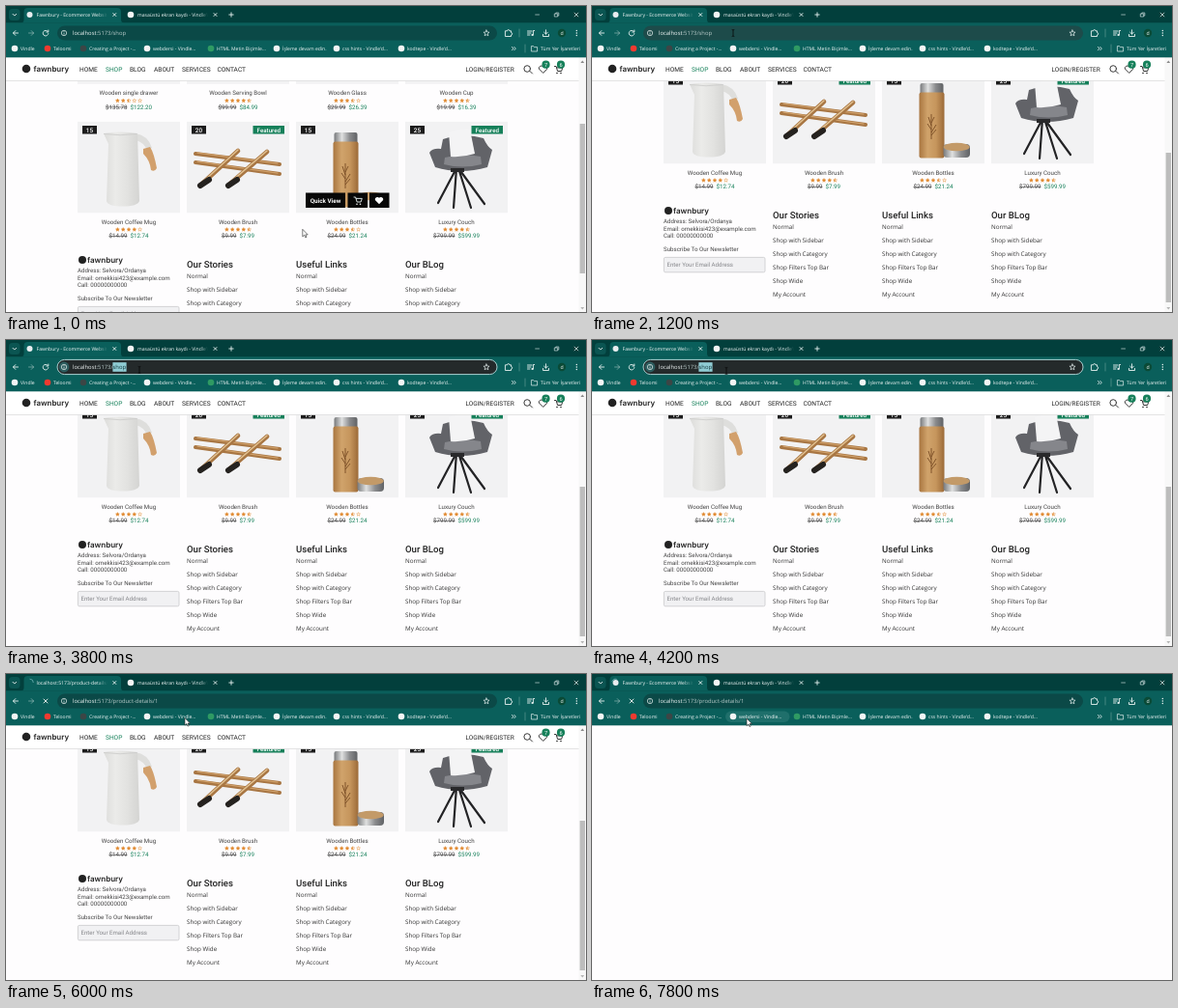
These frames come from a looping animation (600 by 317 pixels, 8 s). An HTML page:

```html
<!DOCTYPE html>
<html lang="tr">
<head>
<meta charset="utf-8">
<title>Fawnbury shop</title>
<style>
html, body { margin: 0; width: 100%; height: 100%; overflow: hidden; background: #fff; }
svg { display: block; width: 100vw; height: 100vh; }
text { white-space: pre; text-rendering: geometricPrecision; }
.ui { font-family: "Open Sans", "Noto Sans", sans-serif; fill: #f2f7f7; }
.pg { font-family: Roboto, Arial, sans-serif; fill: #444; }
.logo { font-family: Inter, Lato, sans-serif; font-weight: 600; fill: #222; }
.ln { fill: none; stroke: #e8f2f1; stroke-width: .9; stroke-linecap: round; stroke-linejoin: round; }
.dk { fill: none; stroke: #222; stroke-width: .9; stroke-linecap: round; stroke-linejoin: round; }
</style>
</head>
<body>
<svg id="stage" viewBox="0 0 600 317" preserveAspectRatio="none"></svg>
<script>
const LOOP = 8000, STEP = 200, SCROLL = 51;
const COLS = [74, 187, 300, 413];
const TEAL = '#0a5f5b', GREEN = '#16805a', ORANGE = '#e0872b', PILL = '#0b4947';

const text = (x, y, size, str, cls = 'ui', more = '') =>
  `<text x="${x}" y="${y}" font-size="${size}" class="${cls}" ${more}>${str}</text>`;
const rect = (x, y, w, h, fill, r = 0, more = '') =>
  `<rect x="${x}" y="${y}" width="${w}" height="${h}" rx="${r}" fill="${fill}" ${more}/>`;
const dot = (x, y, r, fill, more = '') => `<circle cx="${x}" cy="${y}" r="${r}" fill="${fill}" ${more}/>`;
const path = (d, cls = 'ln', more = '') => `<path d="${d}" class="${cls}" ${more}/>`;
const shape = (d, fill, more = '') => `<path d="${d}" fill="${fill}" ${more}/>`;
const group = (id, body, more = '') => `<g id="${id}" ${more}>${body}</g>`;
const cross = (x, y, r, more) => path(`M${x - r} ${y - r}l${2 * r} ${2 * r}m0 ${-2 * r}l${-2 * r} ${2 * r}`, 'ln', more);
const mid = 'text-anchor="middle"';

// Stars
function starPath(cx, cy, r, half) {
  let d = '';
  for (let i = 0; i <= (half ? 5 : 9); i++) {
    const k = half ? i + 5 : i, q = k % 2 ? r * .45 : r, a = k * Math.PI / 5 - Math.PI / 2;
    d += (i ? 'L' : 'M') + (cx + q * Math.cos(a)).toFixed(2) + ' ' + (cy + q * Math.sin(a)).toFixed(2);
  }
  return d + 'Z';
}
function stars(cx, cy, n) {
  let out = '';
  for (let i = 0; i < 5; i++) {
    const x = cx + (i - 2) * 5.8;
    out += shape(starPath(x, cy, 2), n >= i + 1 ? ORANGE : '#fff', `stroke="${ORANGE}" stroke-width=".45"`);
    if (n === i + .5) out += shape(starPath(x, cy, 2, true), ORANGE);
  }
  return out;
}

// Product cards
const rows = [
  [['Wooden single drawer', '135.78', '122.20', 2.5], ['Wooden Serving Bowl', '99.99', '84.99', 4.5],
   ['Wooden Glass', '29.99', '26.39', 3.5], ['Wooden Cup', '19.99', '16.39', 4.5]],
  [['Wooden Coffee Mug', '14.99', '12.74', 4], ['Wooden Brush', '9.99', '7.99', 4.5],
   ['Wooden Bottles', '24.99', '21.24', 3.5], ['Luxury Couch', '799.99', '599.99', 4.5]]
];
function card([name, was, now, rate], x, top) {
  const c = x + 53;
  return rect(x, top, 106, 94.5, '#f2f2f3') +
    text(c, top + 105.7, 6.2, name, 'pg', mid) + stars(c, top + 111.8, rate) +
    text(c, top + 120.6, 6.2, `<tspan text-decoration="line-through">$${was}</tspan>  <tspan fill="${GREEN}">$${now}</tspan>`, 'pg', mid);
}
const badge = (x, n) => rect(x + 5, 124, 15, 8.5, '#1c1c1c') +
  text(x + 12.5, 130.6, 6.4, n, 'pg', mid + ' style="fill:#fff;font-weight:500"');
const featured = x => rect(x + 68.5, 124, 32.5, 8.5, GREEN) +
  text(x + 84.8, 130.5, 6.2, 'Featured', 'pg', mid + ' style="fill:#fff;font-weight:500"');
const stroke = (d, color, w) => path(d, '', `fill="none" stroke="${color}" stroke-width="${w}" stroke-linecap="round"`);

const jug = shape('M134 132Q147 134 151 147L146 150Q143 141 134 139Z', '#dededc') +
  shape('M101 132Q118 129 136 132L138 202Q136 207.5 121 207.5Q105 207.5 104 202L106 143Z', 'url(#jug)') +
  shape('M142 148L149 146Q153 152 156 168Q154 172 150 170Q149 160 142 153Z', '#d2a06c') +
  stroke('M101.5 132.5Q118 135 135 132.5', '#cbcbc9', .8);

const brushes = [[196, 153, 283, 164], [196, 162, 283, 174]].map(([a, b, c, d]) =>
    stroke(`M${a} ${b}L${c} ${d}`, '#a87643', 4) + stroke(`M${a + 2} ${b - .8}L${c - 2} ${d - .8}`, '#cfa06a', 1.2)).join('') +
  [[203, 184, 240, 150], [232, 184, 270, 151]].map(([a, b, c, d]) =>
    stroke(`M${a} ${b}L${c} ${d}`, '#a87643', 4.6) + stroke(`M${a + 2} ${b - 3}L${c} ${d - 1}`, '#e2c190', 1.5) +
    stroke(`M${a - 2} ${b + 2}l9 -6`, '#25221f', 6)).join('');

const bottle = rect(339.5, 131, 24, 12, 'url(#steel)', 2) + rect(338.5, 140.5, 26, 68, 'url(#wood)', 2) +
  path('M351 189V163M351 179l-4-6m4 9l5-8m-5-2l3-6m-3 9l-3-9m3 19l5-6', '', 'fill="none" stroke="#7a4d25" stroke-width=".9"') +
  rect(363.5, 194, 27.5, 14, 'url(#steel)', 4) + `<ellipse cx="377.2" cy="197" rx="13.5" ry="4.3" fill="#c39a68"/>`;

const couch = stroke('M466 168L447 204M466 168L463 209M468 168L481 209M468 168L495 205', '#232325', 2.2) +
  shape('M438 152Q441 147 450 148L452 138Q474 131 494 137Q498 146 503 149L498 167Q470 175 444 167Z', '#626368') +
  shape('M454 157Q472 152 491 156L492 164Q472 169 453 164Z', '#85868b') +
  shape('M458 131Q470 127 480 128L485 153Q472 157 460 156Z', '#f4f4f5') + rect(460, 168, 14, 4, '#29292b');

const heart = (x, y, s) => `M${x} ${y + s}l${-s} ${-s}a${s * .6} ${s * .6} 0 0 1 ${s} ${-s * .55}a${s * .6} ${s * .6} 0 0 1 ${s} ${s * .55}z`;
const cart = (x, y) => `M${x - 4} ${y - 3}h1.6l1.5 5h4l1.2-3.6h-6`;

const hover = rect(310, 193.5, 41, 15.5, '#080808') + text(330.5, 203.5, 6.3, 'Quick View', 'pg', mid + ' style="fill:#fff;font-weight:700"') +
  rect(353.5, 193.5, 20.5, 15.5, '#080808') + path(cart(364, 201)) + dot(363, 205.2, .8, '#fff') + dot(366.5, 205.2, .8, '#fff') +
  rect(376, 193.5, 20.5, 15.5, '#080808') + shape(heart(386, 201, 4.2), '#fff');

// Footer
const links = ['Normal', 'Shop with Sidebar', 'Shop with Category', 'Shop Filters Top Bar', 'Shop Wide', 'My Account'];
const footer = dot(79, 263, 4, '#222') + text(84, 265.8, 8, 'fawnbury', 'logo') +
  ['Address: Selvora/Ordanya', 'Email: ornekkisi423@example.com', 'Call: 00000000000'].map((s, i) =>
    text(74, 276.4 + 7.2 * i, 6.15, s, 'pg')).join('') +
  text(74, 305.2, 6.15, 'Subscribe To Our Newsletter', 'pg') +
  rect(74.4, 311.4, 104.6, 15.4, '#f1f1f3', 1.5, 'stroke="#c9c9cc" stroke-width=".8"') +
  text(77.5, 321.3, 6.1, 'Enter Your Email Address', 'pg', 'style="fill:#85868a"') +
  ['Our Stories', 'Useful Links', 'Our BLog'].map((h, i) =>
    text(COLS[i + 1], 270.6, 9.6, h, 'pg', 'style="fill:#222;font-weight:500"') +
    links.map((s, k) => text(COLS[i + 1], 282.4 + 13.85 * k, 6.25, s, 'ui', 'style="fill:#333;font-weight:500"')).join('')).join('');

const content = rows.map((row, r) => row.map((p, i) => card(p, COLS[i], 119.8 - 133.5 * (1 - r))).join('')).join('') +
  jug + brushes + bottle + couch +
  COLS.map((x, i) => badge(x, [15, 20, 15, 25][i])).join('') + featured(187) + featured(413) +
  group('hover', hover) + footer;

// Shop header
const nav = [['HOME', 76], ['SHOP', 103], ['BLOG', 128], ['ABOUT', 153], ['SERVICES', 182], ['CONTACT', 218.5]];
const tag = (x, n) => dot(x, 60.7, 4.1, GREEN) + text(x, 62.8, 5.6, n, 'pg', mid + ' style="fill:#fff"');
const header = rect(0, 53, 593, 24.5, '#fff') + rect(0, 77, 593, .8, '#dedede') +
  dot(21, 65, 4.3, '#222') + text(28.5, 67.8, 7.9, 'fawnbury', 'logo') +
  nav.map(([s, x]) => text(x, 67.6, 6.6, s, 'pg', `style="fill:${s === 'SHOP' ? GREEN : '#222'}"`)).join('') +
  text(475.5, 67.6, 6.45, 'LOGIN/REGISTER', 'pg', 'style="fill:#222"') +
  path('M542 67.5l2.5 2.5M542.5 65a3.3 3.3 0 1 1-6.6 0a3.3 3.3 0 1 1 6.6 0', 'dk') +
  path(heart(555.5, 65, 4.2), 'dk') + path(cart(571.5, 65.5), 'dk') + dot(570, 69.5, .8, '#222') + dot(574, 69.5, .8, '#222') +
  tag(558.5, 7) + tag(574, 6);

const scrollbar = rect(592.5, 53, 7.5, 264, '#f8f8f8') + shape('M594.4 59l1.9-2.6l1.9 2.6z', '#8a8a8a') +
  shape('M594.4 312l1.9 2.6l1.9-2.6z', '#b5b5b5') + rect(593.6, 122, 5.4, 155, '#bdbdbd', 0, 'id="thumb"');

// Browser frame
const site = 'Fawnbury - Ecommerce Website';
const marks = [
  [5, 'Vindle', '#f4f4f4'], [39, 'Teloomi', '#f03a30'], [76, 'Creating a Project -...', '#3c4646'],
  [142, 'webdersi - Vindle...', '#f4f4f4'], [208, 'HTML Metin Biçimle...', '#2f9a63'], [276, 'İşleme devam edin.', '#f4f4f4'],
  [338, "css hints - Vindle'd...", '#f4f4f4'], [405, "kodtepe - Vindle'd...", '#f4f4f4']
];
const tabs = rect(0, 0, 600, 18, '#023f3c') + rect(3, 3, 11.5, 12, '#0b5552', 3.5) + path('M7 8.3l1.8 1.8l1.8-1.8') +
  shape('M15 17.5Q18.5 17.5 18.5 14V6Q18.5 2 22.5 2H115Q119 2 119 6V14Q119 17.5 122.5 17.5Z', TEAL) +
  group('favicon', dot(24.5, 9, 3, '#e9eef0')) +
  group('spinner', '<path d="M24.5 5.2a3.8 3.8 0 0 1 3.8 3.8" fill="none" stroke="#6fb0b3" stroke-width=".8"/>') +
  text(31.5, 11, 5.1, site, 'ui', 'id="title" clip-path="url(#tab1)"') +
  rect(94, 4, 11, 10, 'url(#fade1)') + cross(112.3, 9, 1.5) +
  dot(129, 9, 3.3, '#f4f4f4') + text(136, 11, 5.1, "masaüstü ekran kaydı - Vindle'da Ara", 'ui', 'clip-path="url(#tab2)"') +
  rect(200, 4, 9, 10, 'url(#fade2)') + cross(216.5, 9, 1.5) + path('M230.8 9h4.4M233 6.8v4.4') +
  path('M547.7 9h3.8M567.7 8h3v3h-3zM568.8 8v-1h3v3h-1', 'ln', 'style="stroke-width:.6"') + cross(590, 9, 1.9, 'style="stroke-width:.7"');

const tools = rect(0, 17.3, 600, 36, TEAL) +
  path('M12.5 28h-5m2.3-2.4l-2.4 2.4l2.4 2.4') + path('M23.5 28h5m-2.3-2.4l2.4 2.4l-2.4 2.4', 'ln', 'opacity=".45"') +
  group('reload', path('M43.2 26.4a2.8 2.8 0 1 0 .6 2.2M43.8 25v2h-2')) + group('stop', cross(41, 28, 2)) +
  rect(53, 20.4, 455, 15.2, PILL, 7.6, 'id="pill"') + dot(60, 28, 5.4, '#2c5c5e', 'id="chip"') +
  dot(60, 28, 2.7, 'none', 'stroke="#e8f2f1" stroke-width=".7"') + path('M60 28v1.3M60 26.6v.01', 'ln', 'style="stroke-width:.7"') +
  rect(110.4, 23.2, 14.2, 9.6, '#8fccd4', 0, 'id="sel"') +
  text(69, 30.2, 5.85, 'localhost<tspan fill="#b9cbca">:5173/</tspan><tspan id="route"></tspan>') +
  rect(124.2, 24.4, .5, 7.4, '#cfdcdc', 0, 'id="caret"') +
  path(starPath(497, 28.2, 3.2), 'ln', 'style="stroke-width:.7"') +
  path('M516.8 25.8h1.7a1.2 1.2 0 0 1 2.4 0h1.6v1.8a1.2 1.2 0 0 1 0 2.4v1.5h-5.7z') + path('M531 24v8', 'ln', 'opacity=".3"') +
  path('M539.5 26h4.5M539.5 28h3.5M539.5 30h2.4M545.4 30v-4.5h1.2') + dot(544.5, 30, 1.1, '#e8f2f1') +
  path('M558.5 24.8v4.2m-1.9-1.8l1.9 1.9l1.9-1.9M555.5 29.5v2h6v-2') +
  dot(575, 28, 4.2, '#0a4a36') + text(575, 29.9, 5.2, 'd', 'ui', mid) +
  [25.4, 28, 30.6].map(y => dot(590.3, y, .75, '#e8f2f1')).join('') +
  rect(138, 38.5, 66.5, 11.5, '#1f6f6b', 5.7, 'id="markHover"') +
  marks.map(([x, s, c]) => dot(x + 4, 44, 3.3, c) + text(x + 10, 45.9, 5.05, s)).join('') +
  path('M523.4 42.4l1.6 1.7l-1.6 1.7m2.3-3.4l1.6 1.7l-1.6 1.7', 'ln', 'style="stroke-width:.8"') + path('M537 40v8', 'ln', 'opacity=".3"') +
  path('M543.4 46.6v-5h2.2l.8 1h3.2v4z', 'ln', 'style="stroke-width:.7"') + text(553, 45.9, 5.05, 'Tüm Yer İşaretleri');

// Suggestions
const blue = rest => `<tspan fill="#c6cacb"> - </tspan><tspan fill="#8ab9f5"><tspan font-weight="700">localhost:5173/p</tspan>${rest}</tspan>`;
const hint = (y, rest) => dot(63, y, 3, '#e9eef0') + text(75, y + 2.1, 5.8, site + blue(rest));
const menu = rect(49, 18, 462, 95, '#000', 9, 'opacity=".25"') + rect(50, 18, 460, 93, '#1f2121', 8) +
  dot(63, 28, 3, '#e9eef0') + rect(119.3, 23.2, 45, 9.6, '#8fccd4') +
  text(75, 30.2, 5.85, 'localhost<tspan fill="#b9cbca">:5173/</tspan>p<tspan fill="#12383c">roduct-details/1</tspan>') +
  shape('M50 37.5H494.5a8.7 8.7 0 0 1 0 17.4H50z', '#3b3d3e') +
  hint(46.2, 'roduct-details/1') + cross(491, 46.2, 1.9) +
  path('M64.2 65l1.8 1.8M64.7 63.4a2 2 0 1 1-4 0a2 2 0 1 1 4 0') +
  text(75, 66, 5.8, 'localhost:5173/p<tspan fill="#a5abab"> - Vindle Arama</tspan>') +
  hint(81.6, 'roduct-details') + hint(99.2, 'roduct-details/');

const grad = (id, stops, more = '') => `<linearGradient id="${id}" ${more}>` +
  stops.map((c, i) => `<stop offset="${i / (stops.length - 1)}" stop-color="${c}"/>`).join('') + '</linearGradient>';
const fade = (id, c) => `<linearGradient id="${id}"><stop stop-color="${c}" stop-opacity="0"/><stop offset="1" stop-color="${c}"/></linearGradient>`;
const clip = (id, x, y, w, h) => `<clipPath id="${id}"><rect x="${x}" y="${y}" width="${w}" height="${h}"/></clipPath>`;

const stage = document.getElementById('stage');
stage.innerHTML = '<defs>' + grad('jug', ['#dcdcda', '#ebebe9', '#e2e2e0', '#d4d4d2']) +
  grad('steel', ['#77797b', '#dfe0e0', '#8b8c8e', '#606265']) + grad('wood', ['#a8753f', '#d0a36b', '#c6965d', '#9c6a38']) +
  fade('fade1', TEAL) + fade('fade2', '#023f3c') +
  clip('tab1', 31, 0, 74, 18) + clip('tab2', 136, 0, 73, 18) + clip('view', 0, 53, 593, 264) + '</defs>' +
  rect(0, 0, 600, 317, '#fefdfe') +
  group('page', `<g clip-path="url(#view)">${group('content', content)}</g>` + header + scrollbar) +
  tabs + tools + group('menu', menu) +
  group('arrow', shape('M0 0V7.6L1.8 6L3 8.6L4.2 8L3 5.6H5.4Z', '#fff', 'stroke="#222" stroke-width=".6"')) +
  group('beam', path('M-1.3 -3.5Q0 -3.5 0 -2.8V2.8Q0 3.5 -1.3 3.5M1.3 -3.5Q0 -3.5 0 -2.8M0 2.8Q0 3.5 1.3 3.5', '', 'fill="none" stroke="#0a0a0a" stroke-width=".8"'));

const el = {};
stage.querySelectorAll('[id]').forEach(n => el[n.id] = n);

// Keys: time, then values
const scrollKeys = [[200, 0], [600, SCROLL]];
const mouseKeys = [[0, 306.8, 231.3], [600, 300, 222], [1200, 146, 28], [2200, 146, 28], [3000, 112, 29],
  [3800, 138, 31], [5000, 141, 34], [5600, 150, 36], [6000, 185, 45.5], [6800, 178, 45.5], [7800, 160, 46]];
function at(keys, t) {
  const i = keys.findIndex(k => k[0] > t);
  if (i < 0) return keys[keys.length - 1].slice(1);
  if (i === 0) return keys[0].slice(1);
  const a = keys[i - 1], b = keys[i], p = (t - a[0]) / (b[0] - a[0]);
  return a.slice(1).map((v, k) => v + (b[k + 1] - v) * p);
}
const show = (node, on) => node.setAttribute('display', on ? 'inline' : 'none');
const move = (node, x, y) => node.setAttribute('transform', `translate(${x} ${y})`);

function draw(time) {
  const t = Math.floor(time % LOOP / STEP) * STEP;
  const [y] = at(scrollKeys, t), [mx, my] = at(mouseKeys, t);
  const focus = t >= 1600 && t < 5600, picked = t >= 3000 && t < 4400;
  const typed = t >= 4400 && t < 5600, loading = t >= 5600, blank = t >= 6800;
  const inPill = my < 36.5;

  move(el.content, 0, -y);
  el.thumb.setAttribute('y', 122 + y * 30 / SCROLL);
  show(el.hover, t < 400);
  show(el.page, !blank);

  el.pill.setAttribute('fill', focus ? '#242a2b' : inPill ? '#1d4b4a' : PILL);
  el.pill.setAttribute('stroke', focus ? '#a9cfd0' : 'none');
  el.route.textContent = loading ? 'product-details/1' : 'shop';
  el.route.setAttribute('fill', picked ? '#12383c' : '#b9cbca');
  show(el.chip, focus);
  show(el.sel, picked);
  show(el.caret, focus && !picked && t % 1000 < 500);
  show(el.menu, typed);

  show(el.reload, !loading);
  show(el.stop, loading);
  el.title.textContent = loading && !blank ? 'localhost:5173/product-details/1' : site;
  show(el.favicon, !loading || blank);
  show(el.spinner, loading);
  el.spinner.setAttribute('transform', `rotate(${t * .36 % 360} 24.5 9)`);
  show(el.markHover, t > 6000 && my > 38);

  show(el.beam, inPill);
  show(el.arrow, !inPill);
  move(el.beam, mx, my);
  move(el.arrow, mx, my);
}

const start = performance.now();
function tick() {
  draw(performance.now() - start);
  requestAnimationFrame(tick);
}
tick();
</script>
</body>
</html>
```
